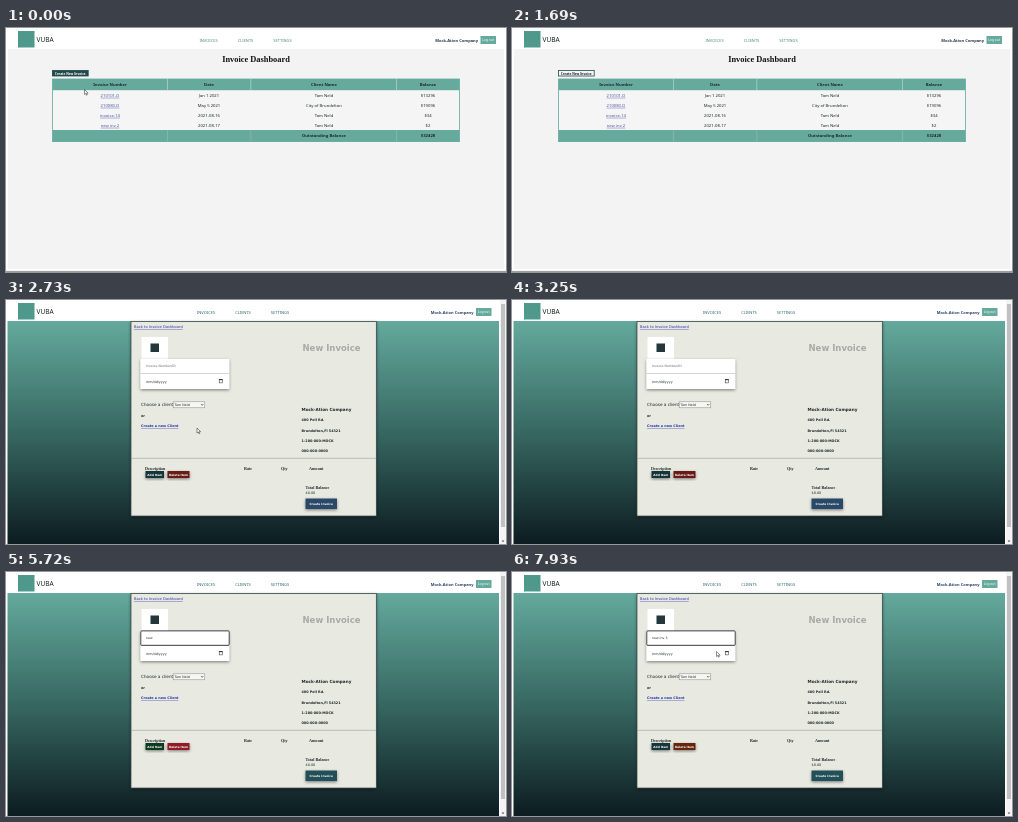
An HTML page for the animation above (8 s loop, 500 px wide and 244 px high).

```html
<!DOCTYPE html>
<html lang="en">
<head>
<meta charset="utf-8">
<title>Invoices</title>
<style>
html, body { margin: 0; width: 100%; height: 100%; overflow: hidden; background: #fff; }
svg { display: block; width: 100vw; height: 100vh; }
text { white-space: pre; }
.ui { font-family: "Noto Sans", "Open Sans", sans-serif; }
.form { font-family: "DejaVu Sans", sans-serif; }
.serif { font-family: "Liberation Serif", serif; }
.b { font-weight: bold; }
.mid { text-anchor: middle; }
.link { text-decoration: underline; }
</style>
</head>
<body>
<svg id="stage" viewBox="0 0 500 244" preserveAspectRatio="none"></svg>
<script>
const LOOP = 8000, STEP = 130;
const COMPANY = 'Mock-Ation Company', CLIENT = 'Tam Neld';
const TEAL = '#66aa9d', INK = '#20282a', BLUE = '#2b35a8';

const text = (s, x, y, size, cls, fill = INK, extra = '') =>
  `<text x="${x}" y="${y}" font-size="${size}" class="${cls}" fill="${fill}" ${extra}>${s}</text>`;
const rect = (x, y, w, h, fill, extra = '') =>
  `<rect x="${x}" y="${y}" width="${w}" height="${h}" fill="${fill}" ${extra}/>`;
const line = (x1, y1, x2, y2, stroke, width = 0.6) =>
  `<path d="M${x1} ${y1}L${x2} ${y2}" stroke="${stroke}" stroke-width="${width}"/>`;
const group = (id, body) => `<g id="${id}">${body}</g>`;

// Top bar; the brand is its own group since it loads late on the form page.
function header(id, navX, right, navColor, nameColor) {
  const nav = ['INVOICES', 'CLIENTS', 'SETTINGS']
    .map((s, i) => text(s, navX + i * 37, 13.6, 4, 'ui mid', navColor)).join('');
  const account = text(COMPANY, right - 18, 13.7, 4, 'ui b', nameColor, 'text-anchor="end"') +
    rect(right - 15.5, 8, 15.5, 8, TEAL) +
    text('Log out', right - 7.8, 13.2, 3.3, 'ui mid', '#fff');
  return group(id + 'Brand', rect(12, 3, 16.5, 16.5, '#4f988c') + text('VUBA', 30.5, 14.2, 6.6, 'ui')) +
    group(id + 'Nav', nav) + group(id + 'User', account);
}

function dashboard() {
  const cols = [104, 203, 318, 422];
  const rows = [
    ['210101-D', 'Jan 1 2021', CLIENT, '$13296'],
    ['210080-D', 'May 5 2021', 'City of Brundelton', '$19096'],
    ['invoice-14', '2021-08-16', CLIENT, '$34'],
    ['new inv 2', '2021-08-17', CLIENT, '$2']
  ];
  const cells = (row, y, cls) => row.map((s, i) =>
    text(s, cols[i], y, 4.2, 'ui mid ' + (cls || (i ? '' : 'link')), cls || i ? INK : '#5554a8')).join('');
  return rect(2, 21, 496, 220, '#f2f3f2') + line(0, 243.4, 500, 243.4, '#777', 0.8) +
    header('dash', 202.5, 490, '#4f8a80', '#26344f') +
    text('Invoice Dashboard', 250, 34.3, 8.4, 'serif b mid', '#111') +
    rect(46.4, 42.4, 35.8, 5.6, '#24494b', 'id="newBtn" stroke="#24494b" stroke-width=".8"') +
    text('Create New Invoice', 64.3, 46.5, 3.2, 'ui b mid', '#fff', 'id="newLabel"') +
    rect(46.5, 51, 407, 62.6, '#f4f5f4', `stroke="${TEAL}" stroke-width=".8"`) +
    rect(46.5, 51, 407, 11.2, TEAL) + rect(46.5, 102, 407, 11.8, TEAL) +
    [161.5, 244.8, 390.5].map(x => line(x, 51, x, 62.2, '#c5ded9') + line(x, 102, x, 113.8, '#8fc1b8')).join('') +
    cells(['Invoice Number', 'Date', 'Client Name', 'Balance'], 58.2, 'b') +
    rows.map((row, i) => cells(row, 68.8 + i * 10, '')).join('') +
    cells(['', '', 'Outstanding Balance', '$32428'], 109.4, 'b');
}

function button(id, x, y, w, h, label) {
  return rect(x, y, w, h, '#000', `id="${id}" filter="url(#soft)"`) +
    text(label, x + w / 2, y + h / 2 + 1.1, 2.9, 'form b mid', '#fff');
}

function invoiceForm() {
  const address = ['480 Pell Rd.', 'Brundelton,Fl 54321', '1-200-000-MOCK', '000-000-0000'];
  const heads = [['Description', 139], ['Rate', 238], ['Qty', 275], ['Amount', 303]];
  const body = rect(1.5, 21, 491.5, 233, 'url(#sea)') +
    rect(125, 21.5, 245.3, 194.5, '#e8e9e1', 'stroke="#31413f" stroke-width=".7" filter="url(#soft)"') +
    text('Back to Invoice Dashboard', 128, 28.2, 3.65, 'form link', BLUE) +
    rect(135.5, 37, 26.5, 22, '#fff') + rect(144.5, 43.5, 8.5, 8.5, '#23363a') +
    text('New Invoice', 296.5, 50.6, 8.5, 'form b', '#a8aaa7') +
    rect(134.5, 59, 88.7, 30, '#fff', 'filter="url(#soft)"') +
    line(134.5, 73.5, 223.2, 73.5, '#aaa', 0.5) +
    rect(134.8, 58.9, 88.4, 14.4, 'none', 'id="focus" rx=".8" stroke="#1a1c28" stroke-width=".8"') +
    text('', 140, 67.4, 3.2, 'form', '#666', 'id="field"') +
    rect(139.4, 64, 0.6, 4.4, '#111', 'id="caret"') +
    text('mm/dd/yyyy', 140, 82.5, 3.3, 'form') +
    rect(213.2, 79.5, 3.4, 3.4, 'none', 'stroke="#222" stroke-width=".5"') +
    line(213.2, 79.7, 216.6, 79.7, '#222', 0.9) +
    text('Choose a client', 135, 106.2, 4.2, 'form') +
    rect(167.2, 101.8, 31.6, 6, '#f6f6f3', 'stroke="#888" stroke-width=".5"') +
    text(CLIENT, 168.6, 106.1, 3.3, 'form') +
    '<path d="M195 104l1.2 1.3 1.2-1.3" fill="none" stroke="#222" stroke-width=".6"/>' +
    text('or', 135, 117, 3.4, 'form b') +
    text('Create a new Client', 135, 127.4, 3.4, 'form b link', BLUE) +
    text(COMPANY, 295.5, 111.2, 4.2, 'form b') +
    address.map((s, i) => text(s, 295.5, 121.4 + i * 10.1, 3.4, 'form b')).join('') +
    line(125, 158.3, 370, 158.3, '#9b9d98') +
    heads.map(([s, x]) => text(s, x, 169.9, 4.1, 'serif b')).join('') +
    button('add', 139.5, 171, 18.5, 7, 'Add Item') +
    button('del', 161.5, 171, 22, 7, 'Delete Item') +
    text('Total Balance', 299.5, 189, 4.1, 'serif b') + text('$0.00', 299.5, 193.6, 3.4, 'form') +
    button('make', 299.5, 198.5, 31.5, 10.5, 'Create Invoice');
  const scrollbar = rect(494, 0, 6, 244, '#f4f4f4') + rect(495, 4, 4, 223, '#c1c1c1', 'id="thumb"') +
    '<path d="M495.6 240.5h2.8l-1.4 1.8z" fill="#555"/>';
  return group('sheet', body) + scrollbar + header('form', 200, 485.5, '#33686f', '#28436b');
}

document.getElementById('stage').innerHTML = `
<defs>
  <linearGradient id="sea" x1="0" y1="0" x2="0" y2="1">
    <stop offset="0" stop-color="#64a99d"/><stop offset=".5" stop-color="#35645f"/>
    <stop offset=".95" stop-color="#0d1d22"/>
  </linearGradient>
  <filter id="soft" x="-20%" y="-20%" width="140%" height="150%">
    <feDropShadow dx="0" dy="1.2" stdDeviation="1.6" flood-color="#000" flood-opacity=".45"/>
  </filter>
</defs>` + rect(0, 0, 500, 244, '#fff') + group('list', dashboard()) + group('entry', invoiceForm()) +
  '<path id="cursor" d="M0 0V5L1.2 4 2 5.8 2.8 5.4 2 3.7H3.6Z" fill="#fff" stroke="#222" stroke-width=".5"/>';

const $ = id => document.getElementById(id);
const set = (id, attrs) => { for (const k in attrs) $(id).setAttribute(k, attrs[k]); };
const show = (id, on) => { $(id).style.display = on ? '' : 'none'; };
// Last entry of [time, ...values] that has started.
const at = (keys, t) => keys.reduce((found, k) => k[0] <= t ? k : found);

const path = [[0, 78.5, 61.5], [260, 78, 59], [780, 68, 45], [1560, 64, 45],
  [1950, 63, 47], [2210, 95, 68], [2730, 191, 128], [3250, 168, 66], [7800, 190, 72], [7930, 204.5, 79.5], [8000, 204.5, 79.5]];
const typed = [[0, ''], [4680, 'n'], [4810, 'ne'], [4940, 'new'], [5070, 'new '],
  [5980, 'new i'], [6110, 'new inv'], [6630, 'new inv '], [6760, 'new inv 3']];
const blink = [[0, 0], [3510, 1], [4160, 0], [4680, 1], [5720, 0], [5980, 1], [7020, 0], [7540, 1], [7800, 0]];
const tints = [[0, '#128526', '#8d131b', '#1f4a52'], [2080, '#14353a', '#671c14', '#2a4a68'],
  [3510, '#103b22', '#8f1c26', '#2a4a68'], [5720, '#103b22', '#8f1c26', '#234f58'],
  [7020, '#14373a', '#66260f', '#234f58']];

function cursorAt(t) {
  const i = Math.min(path.findLastIndex(k => k[0] <= t), path.length - 2);
  const [t0, x0, y0] = path[i], [t1, x1, y1] = path[i + 1];
  const p = (t - t0) / (t1 - t0), e = p * p * (3 - 2 * p);
  return [x0 + (x1 - x0) * e, y0 + (y1 - y0) * e];
}

function draw(t) {
  const onForm = t >= 1950, loaded = t >= 2080, hover = t >= 780;
  show('list', !onForm);
  show('entry', onForm);

  set('newBtn', { fill: hover ? '#f4f5f4' : '#24494b' });
  set('newLabel', { fill: hover ? INK : '#fff' });

  // Without the brand image the bar is shorter and the menu sits further left.
  show('formBrand', loaded);
  set('sheet', { transform: `translate(0 ${loaded ? 0 : -11})` });
  set('formNav', { transform: loaded ? '' : 'translate(-19.5 -5)' });
  set('formUser', { transform: loaded ? '' : 'translate(-.5 -5)' });
  set('thumb', { height: loaded ? 223 : 234 });

  const [, add, del, make] = at(tints, t);
  set('add', { fill: add });
  set('del', { fill: del });
  set('make', { fill: make });

  const value = at(typed, t)[1], field = $('field');
  field.textContent = value || 'Invoice Number/ID';
  set('field', { fill: value ? INK : '#666' });
  show('focus', t >= 3510);
  show('caret', at(blink, t)[1]);
  set('caret', { x: value ? 140.2 + field.getComputedTextLength() : 139.4 });

  show('cursor', t < 1560 || (onForm && t < 3250) || t >= 7800);
  set('cursor', { transform: `translate(${cursorAt(t)})` });
}

const start = performance.now();
function frame() {
  const t = (performance.now() - start) % LOOP;
  draw(Math.floor(t / STEP) * STEP);
  requestAnimationFrame(frame);
}
frame();
</script>
</body>
</html>
```
